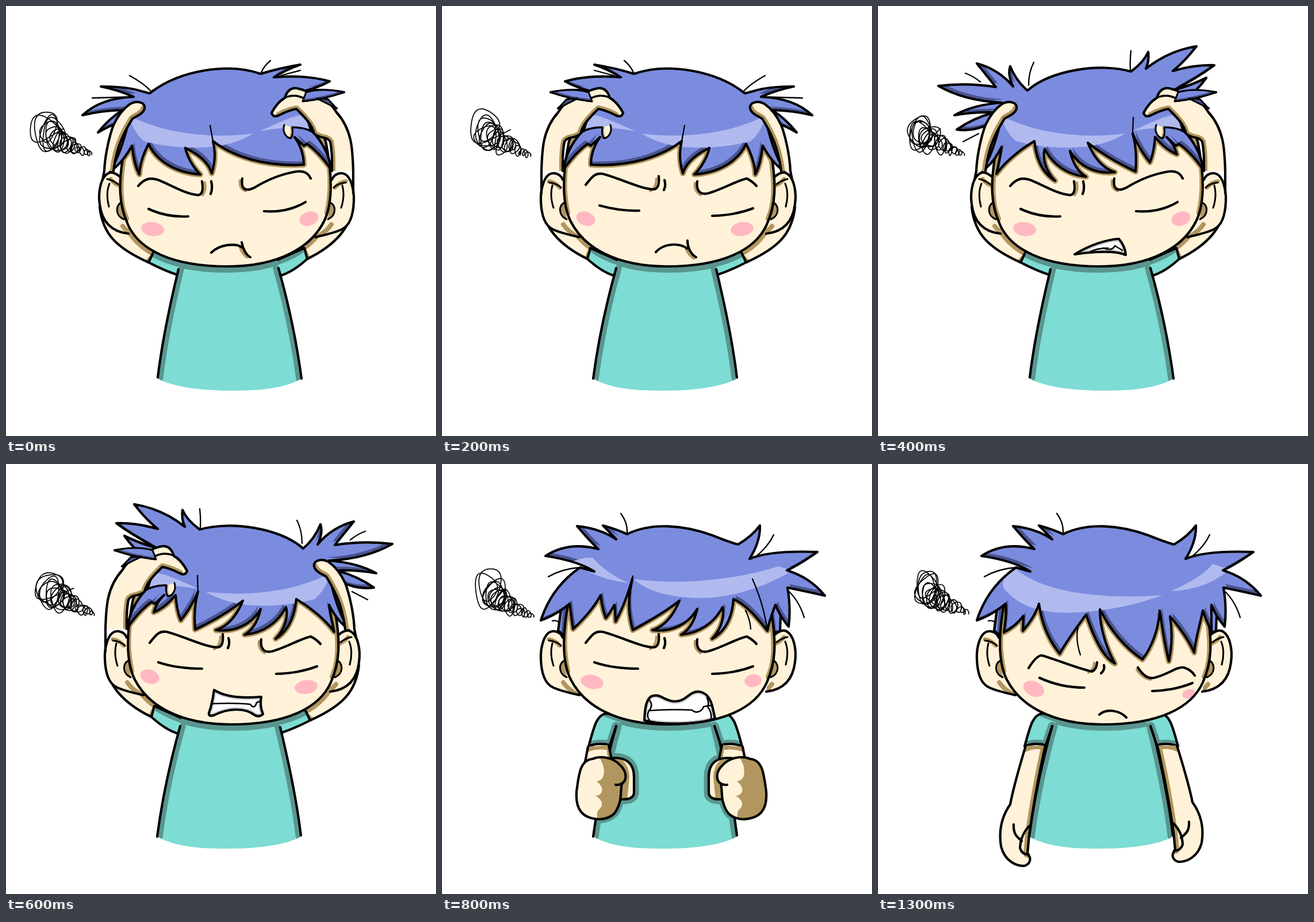
Recreate the animation shown at these times as an HTML page. Size 748 by 748 pixels, loop 1.5 s.

```html
<!DOCTYPE html>
<html>
<head>
<meta charset="utf-8">
<style>
html, body { margin: 0; width: 100%; height: 100%; overflow: hidden; background: #fff }
svg { display: block; width: 100vw; height: 100vh; stroke-linecap: round; stroke-linejoin: round }
</style>
</head>
<body>
<svg id="stage" viewBox="0 0 748 748"></svg>
<script>
const SKIN = '#fff2d9', TAN = '#b2965f', HAIR = '#7b8cdf', NAVY = '#4b5590',
  SHINE = '#b0baef', TEAL = '#7ddcd3', DEEP = '#5a958f', PINK = '#ffb8c1', WIDTH = 777;
let clips = 0;

const fill = (d, color, more = '') => `<path d="${d}" fill="${color}" ${more}/>`;
const line = (d, w = 4.2, color = '#000') =>
  `<path d="${d}" fill="none" stroke="${color}" stroke-width="${w}"/>`;
// Filled shape with shading clipped to its inside, then its outline.
const part = (d, color, inside = '', w = 4.2) => {
  const id = 'c' + ++clips;
  return `<clipPath id="${id}"><path d="${d}"/></clipPath>` + fill(d, color) +
    `<g clip-path="url(#${id})">${inside}</g>` + (w ? line(d, w) : '');
};
const flip = s => `<g transform="matrix(-1 0 0 1 ${WIDTH} 0)">${s}</g>`;
const mirror = (d, w = WIDTH) => d.replace(/(\d+) (\d+)/g, (_, x, y) => `${w - x} ${y}`);
const same = d => d;
const blush = (x, y, rx, ry, turn) =>
  `<ellipse rx="${rx}" ry="${ry}" fill="${PINK}" transform="translate(${x} ${y}) rotate(${turn})"/>`;

// Body
const HEAD = 'M225 200L203 265C196 310 196 345 212 380C232 425 290 453 385 453C475 453 530 420 553 375C568 345 569 300 556 235L540 200Z';
const BODY = 'M264 648C272 580 285 520 300 458L305 430L470 430L474 456C492 520 505 580 514 648C480 668 430 669 390 669C340 669 290 663 264 648Z';
const SIDES = 'M264 646C272 580 285 520 300 458M474 456C492 520 505 580 514 648';

const torso = (m, extra = '') => part(m(BODY), TEAL,
  line(m(SIDES), 19, DEEP) + line(m(HEAD), 22, DEEP) + extra, 0) + line(m(SIDES));

const head = (m, hair, cheeks) => part(m(HEAD), SKIN,
  line(m('M203 265C196 310 196 345 208 370M560 360C569 320 567 280 556 235'), 12, TAN) +
  line(hair, 10, TAN) + cheeks);

const ears = m =>
  part(m('M198 297C190 290 184 289 180 290C164 296 160 325 163 345C166 370 178 392 213 396'), SKIN,
    line(m('M203 383Q209 390 216 398'), 8, TAN)) +
  part(m('M567 302C570 294 578 290 585 291C600 293 606 320 605 340C604 365 597 382 585 388C572 395 555 398 538 402'), SKIN,
    line(m('M566 380Q557 393 540 402'), 8, TAN)) +
  line(m('M182 301Q188 309 196 312M572 316Q580 307 591 305'), 7, TAN) +
  line(m('M176 301Q186 303 195 310M180 309Q173 326 179 349M570 316Q578 308 591 307M585 312Q590 330 583 351'), 3) +
  part(m('M203 341C190 344 189 365 205 371'), TAN, '', 3) +
  part(m('M563 342C575 345 575 365 560 371'), TAN, '', 3);

const raisedArms = () =>
  part('M268 436L248 446C190 420 168 395 163 350L205 350', SKIN,
    line(HEAD, 17, TAN) + line('M262 432L248 446', 13, TAN)) +
  part('M510 436L524 440C565 420 600 390 604 345L560 345', SKIN,
    line(HEAD, 17, TAN) + line('M516 425L524 442', 13, TAN)) +
  part('M310 445L257 427L248 446Q275 460 299 468', TEAL, line(HEAD, 20, DEEP)) +
  part('M465 445L519 421L524 440Q500 462 478 469', TEAL, line(HEAD, 20, DEEP));

const raisedHands = () => {
  const left = 'M171 287C172 260 180 225 187 207C195 190 205 178 215 171C228 163 243 168 241 178C239 188 225 192 220 196C205 220 192 245 187 287';
  const right = 'M604 287C603 250 602 215 575 185C562 165 545 152 528 153Q522 146 505 143C494 142 488 150 485 160C475 165 466 178 462 186Q465 195 475 190Q490 182 505 179C518 192 532 205 536 222C548 232 558 226 564 236C568 255 567 270 567 287';
  return part(left, SKIN, line('M241 178C239 188 225 192 220 196C205 220 192 245 187 287', 13, TAN)) +
    part('M484 207C480 220 488 230 496 230Q500 222 498 211', SKIN, line('M496 230Q500 222 498 211', 7, TAN), 3) +
    part(right, SKIN, line('M475 190Q490 182 505 179C518 192 532 205 536 222C548 232 558 226 564 236C568 255 567 270 567 287', 12, TAN)) +
    line('M171 287L168 302M604 287L604 325') +
    line('M486 159Q506 151 525 165M499 211Q520 211 535 220', 3.5) +
    part('M588 150Q550 142 522 150L516 166Q555 162 588 150Z', HAIR, line('M516 166Q555 162 588 150', 8, NAVY), 3) +
    part('M541 161L575 178L560 162Z', NAVY, '', 3);
};

const sleeve = () => part('M320 440L285 434C268 437 264 460 255 491Q272 484 292 489L303 456', TEAL,
  line('M255 491Q272 484 292 489L303 456', 15, DEEP) + line('M285 434L320 447', 12, DEEP));

const FIST = 'M262 513C240 515 238 540 234 570C232 600 243 617 275 618C298 616 305 605 310 585C312 570 311 565 313 556C322 550 322 535 310 524C298 510 275 507 262 513Z';
const PALM = 'M290 512C320 508 334 520 334 545L334 572Q333 585 310 583';
const KNUCKLES = 'M272 508Q286 528 280 545Q276 551 269 552Q282 562 277 572Q274 577 267 577Q283 587 276 598Q266 606 272 620L330 620L330 505Z';
const otherFist = d => mirror(d, 798);
// The light comes from the left on both fists.
const fist = (m, shift) =>
  part(m(PALM), SKIN, line(m('M290 512C306 512 320 524 320 545L316 585'), 12, TAN)) +
  part(m(FIST), SKIN, fill(KNUCKLES, TAN, `transform="translate(${shift})"`)) +
  line(m('M313 556Q307 559 302 558'));
const fistShadow = m => line(m(PALM), 17, DEEP) + line(m(FIST), 14, DEEP);
const wrist = () => part('M254 492L249 518L296 518L290 489', SKIN,
  line('M250 494Q272 486 294 491', 15, TAN) + line('M290 489L294 518', 9, TAN));

const hangingArm = () =>
  part('M257 490C245 530 235 565 230 592C214 615 210 640 214 665C220 690 240 700 255 699C266 695 267 685 260 678L263 645C272 580 282 530 291 490', SKIN,
    line('M255 494Q273 486 292 491M291 490C282 530 272 580 263 645L260 678', 14, TAN)) +
  line('M236 627C235 645 243 649 250 656M263 630Q248 645 247 668Q251 680 262 679');

// Hair
const GRIP = 'L575 178L520 182L530 215Q560 245 566 285Q545 255 524 240L518 243L502 228';
const FLAT = 'M250 152C300 112 385 98 443 118Q475 108 512 102Q488 110 466 124Q520 119 563 131Q545 141 522 147Q556 144 588 150Q560 156 538 165' + GRIP +
  'Q518 250 518 276C450 280 395 262 360 235C365 255 364 272 358 291C352 272 335 258 312 247C315 262 325 280 338 293C295 290 262 270 248 240C240 255 233 272 232 293C225 280 222 265 219 243C210 260 195 280 181 287' +
  'C195 265 205 235 212 205L197 203Q180 208 160 220Q180 195 203 181Q165 182 133 190Q165 160 222 158Q195 146 165 140Q210 140 235 148Z';
const WILD = 'M260 147C300 112 385 98 440 114Q462 98 470 80Q472 96 466 109Q505 78 554 70Q535 95 513 113Q550 102 585 103Q555 125 515 146Q545 138 571 125Q555 148 538 158Q565 148 588 150Q565 156 540 165' + GRIP +
  'Q515 240 520 258Q500 250 482 228Q480 255 473 272Q455 250 443 222C448 240 450 265 448 288C425 277 395 262 365 238C375 262 390 282 412 289C380 293 350 280 334 252C338 270 345 287 362 297C330 294 305 277 290 249C286 262 290 285 308 304C285 290 275 265 272 235Q228 262 206 292Q212 265 215 245Q200 275 181 287' +
  'C195 265 205 235 212 205L182 210Q160 218 137 215Q165 195 203 185Q165 184 133 190Q165 172 215 168Q150 165 105 139Q155 133 205 141Q188 120 172 100Q210 110 235 140Q225 120 230 105Q240 130 260 147Z';
const crop = bangs => 'M322 122C365 101 420 106 470 124Q500 136 515 140Q540 125 553 107Q554 135 535 165Q570 150 653 153Q620 176 600 185Q640 197 666 229Q635 222 601 215Q607 250 603 283Q588 265 580 245' + bangs +
  'Q224 260 222 243Q200 262 172 272Q190 215 240 180Q250 183 265 187Q235 168 180 160Q220 134 272 148Q255 132 235 108Q275 112 303 131Q293 120 280 107Q305 114 322 122Z';
const SWEPT = crop('Q570 270 566 290C550 270 530 245 507 235C505 265 495 290 470 304C488 285 491 262 488 249C473 277 448 294 416 297C433 287 440 270 444 252C428 280 398 293 366 289C388 282 403 262 413 238C383 262 353 277 332 289C325 265 322 235 331 200Q320 240 302 274Q301 255 300 245Q290 262 285 268Q278 250 276 228Q262 255 228 287');
const DROOP = crop('L580 291Q572 275 565 255C560 280 553 300 550 328C540 305 525 285 508 265C512 290 512 315 506 343C500 320 495 290 490 255C488 290 475 320 460 340C430 320 405 290 386 253C386 290 400 325 412 347C390 335 375 300 362 262C345 285 330 305 316 330C300 310 285 280 280 243C275 260 265 275 252 290L253 264Q240 282 219 293');

const hair = (d, shine, wisps) =>
  part(d, NAVY, fill(d, HAIR, 'transform="translate(4 -6)"') + fill(shine, SHINE)) + line(wisps, 2.3);

const BAND = 'M213 190C270 220 350 232 430 222Q400 240 360 245C310 249 270 243 240 235Q222 220 213 190ZM440 218C470 205 500 190 515 190L535 214Q490 208 440 218Z';
const FLAT_WISPS = 'M215 121Q240 135 252 148M150 160L222 158M460 95Q448 105 444 116M478 121L512 112M360 235L355 208';
const WILD_WISPS = 'M152 117Q166 122 178 132M271 98Q262 115 262 138M440 78Q438 95 439 111M148 236L175 222M443 222L444 194';
const CROP_WISPS = 'M311 86Q323 102 322 120M185 196Q210 182 240 180M577 123Q568 143 545 162M604 222Q622 240 630 267M192 273Q198 271 203 275';

// Faces
const TIRED = 'M230 313C242 299 252 298 266 303C290 313 312 327 334 329C343 328 343 316 341 305M357 305Q360 317 356 327M411 300C408 320 418 323 432 316C455 302 480 292 505 288C520 286 526 292 530 300M248 353Q280 368 317 366M449 357Q490 360 521 341';
const tense = eye => 'M250 311C262 296 266 290 280 292C310 300 345 318 368 319C377 318 378 307 377 296M387 303Q390 312 386 320M444 305C442 320 448 329 462 326C485 320 510 305 530 300Q540 305 547 313M470 365Q510 364 541 352' + eye;
const TENSE = tense('M265 345Q298 356 341 356');
const SAD = 'M262 355C270 342 278 333 285 333C310 340 345 355 372 361Q380 358 381 345M393 350Q395 358 388 364M452 354C460 366 468 374 480 372C505 366 520 352 532 354Q545 358 551 368M281 372Q318 389 359 389M477 395Q515 394 547 381M385 436C398 425 420 428 432 441';
const tiredShade = line('M346 307Q349 320 342 329M407 303Q405 318 417 322', 4, TAN);
const tenseShade = line('M373 300Q373 316 362 322M440 308Q438 322 450 329', 4, TAN);

const teeth = (d, bite) => part(d, '#fff', line(d, 9, '#d4d4d8')) + line(bite, 2.6);
const pout = (lip, corner, shade) => line(shade, 6, TAN) + line(lip + corner);
const SNARL = 'M342 432C370 415 395 407 419 405C425 412 430 420 431 433C420 428 400 427 380 428Q360 429 342 432Z';
const GRIT = 'M362 393C385 408 420 407 444 405Q441 420 447 435Q441 441 433 437C415 423 385 425 362 437Q352 440 353 433C358 420 360 408 362 393Z';
const RAGE = 'M352 446C353 425 355 410 364 404C380 398 385 412 405 413C425 413 430 395 447 396C462 398 468 410 471 425L475 443C440 454 380 454 352 446Z';

// Scrawl: a wobbling spiral that drifts right and shrinks into a zigzag.
const scrawl = (seed, dx, dy) => {
  const rnd = () => (seed = seed * 16807 % 2147483647) / 2147483647;
  const n = 62, pts = [];
  for (let i = 0; i <= n; i++) {
    const t = i / n, r = 46 * (1 - t) + 6, a = i * 1.95 + rnd() * 0.6;
    const wob = 0.65 + rnd() * 0.55;
    pts.push([71 + dx + 78 * t ** 1.4 + r * 0.72 * wob * Math.cos(a), 213 + dy + 45 * t + r * wob * Math.sin(a)]);
  }
  const d = pts.slice(1).map(([x, y], i) =>
    `Q${pts[i].map(v => v.toFixed(1)).join(' ')} ${((x + pts[i][0]) / 2).toFixed(1)} ${((y + pts[i][1]) / 2).toFixed(1)}`);
  return line(`M${pts[0].join(' ')}` + d.join(''), 1.7);
};

// Poses
const clutch = (d, wisps) => raisedArms() + torso(same) + ears(same) +
  head(same, d, blush(255, 388, 20, 12, 8) + blush(527, 370, 17, 12, -20)) +
  hair(d, BAND, wisps) + raisedHands();

const front = (d, shine, wisps, cheeks, extra = '') =>
  torso(mirror, extra) + sleeve() + flip(sleeve()) +
  part('M210 230L202 290L213 299L225 230Z', HAIR, line('M213 299L218 230', 12, NAVY)) +
  part('M570 240L577 293L588 291L590 240Z', HAIR, line('M577 293L570 240', 10, NAVY)) +
  ears(mirror) + head(mirror, d, cheeks) + hair(d, shine, CROP_WISPS + wisps);

const frames = [
  [200, clutch(FLAT, FLAT_WISPS) + tiredShade + line(TIRED) +
    pout('M357 429C372 414 400 412 411 420', 'M410 411C412 423 418 433 425 437', 'M408 420Q412 431 419 436') + scrawl(17, 0, 0)],
  [200, flip(clutch(FLAT, FLAT_WISPS)) + tenseShade + line(tense('M274 347Q310 357 343 356')) +
    pout('M372 428C385 413 412 411 427 422', 'M427 408C427 420 433 432 442 437', 'M425 422Q429 432 438 438') + scrawl(91, 4, 2)],
  [200, clutch(WILD, WILD_WISPS) + tiredShade + line(TIRED) +
    teeth(SNARL, 'M392 421Q408 427 412 417L425 425M366 429Q380 421 400 421') + scrawl(233, 0, 0)],
  [200, flip(clutch(WILD, WILD_WISPS)) + tenseShade + line(TENSE) +
    teeth(GRIT, 'M357 417Q400 415 425 418Q432 428 436 415L444 412') + scrawl(577, 4, 3)],
  [500, front(SWEPT,
    'M226 170Q245 162 262 163Q288 192 325 207Q270 202 226 170ZM333 200C400 210 500 205 585 178L610 185C560 215 500 235 440 233C400 231 360 224 333 200Z',
    'M528 255Q536 270 537 287M540 200Q560 245 566 290M331 200L332 195',
    blush(261, 379, 20, 12, 12) + blush(541, 377, 15, 11, -10),
    fistShadow(same) + fistShadow(otherFist)) +
    tenseShade + line(TENSE) +
    teeth(RAGE, 'M360 429Q395 426 435 428C440 434 452 432 455 422L468 420M361 411Q368 420 360 429Q355 438 361 446M461 407Q465 415 462 422Q470 433 468 444') +
    wrist() + flip(wrist()) + fist(same, 0) + fist(otherFist, 244) + scrawl(1301, 9, 6)],
  [200, front(DROOP,
    'M240 182C290 230 420 235 495 228C450 245 400 255 350 258C290 262 245 250 218 215Q213 190 240 182ZM510 221C545 205 570 190 582 174L610 183C590 205 550 220 510 221Z',
    'M348 282Q343 305 352 332', blush(271, 391, 19, 13, 25) + blush(541, 400, 12, 8, -10)) +
    line('M376 346Q376 356 366 363M450 358Q462 374 474 375', 4, TAN) + line(SAD) + hangingArm() +
    `<g transform="translate(${WIDTH} 16) scale(-1 .967)">${hangingArm()}</g>` + scrawl(4099, 8, 1)]
];

const stage = document.getElementById('stage');
stage.innerHTML = frames.map(([, art]) => `<g visibility="hidden">${art}</g>`).join('');
const groups = [...stage.children];
const loop = frames.reduce((sum, [ms]) => sum + ms, 0);

function draw() {
  let t = performance.now() % loop, now = 0;
  while (t >= frames[now][0]) t -= frames[now++][0];
  groups.forEach((g, i) => g.setAttribute('visibility', i === now ? 'visible' : 'hidden'));
  requestAnimationFrame(draw);
}
draw();
</script>
</body>
</html>
```
